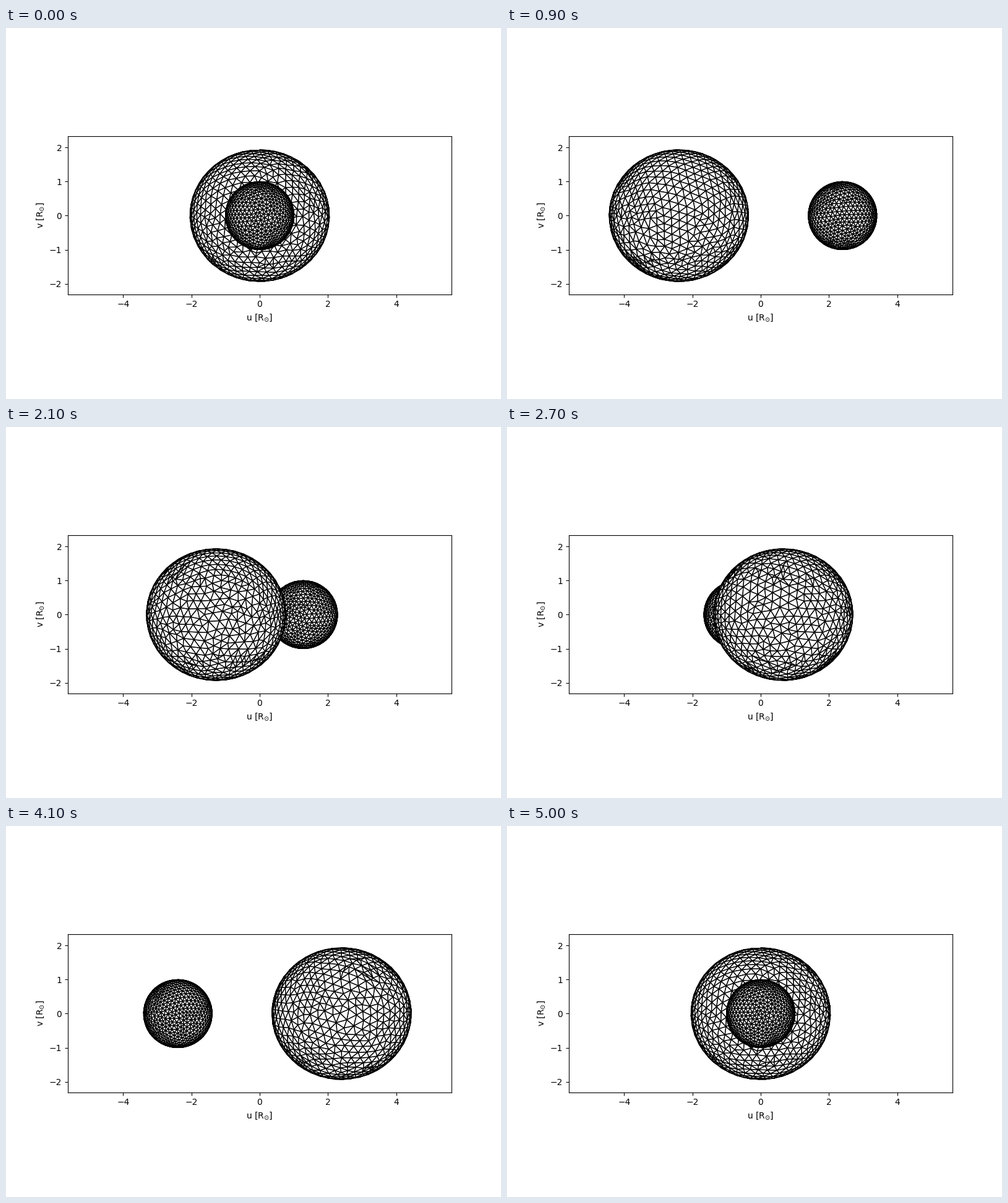
A matplotlib script for the animation above (5.1 s loop, 800 px wide and 600 px high).

```python
import math

import numpy as np
import matplotlib.pyplot as plt
from matplotlib.animation import FuncAnimation
from matplotlib.collections import PolyCollection
from matplotlib.tri import Triangulation

FRAMES, INTERVAL = 51, 100
SMA = 5.3            # separation of the two stars, in solar radii
TRIANGLES = 1500     # per star
TAU = 2 * math.pi


def unit(v):
    return v / np.linalg.norm(v, axis=-1, keepdims=True)


def gradient(p):
    """Gradient of the rotating-star potential (separation = 1)."""
    r = np.linalg.norm(p, axis=-1, keepdims=True)
    return -p / r**3 + 2 * p * np.array([1, 1, 0])


def normal(p):
    return -unit(gradient(p))


def project(p, pole):
    """Move p onto the equipotential surface with the given polar radius."""
    for _ in range(8):
        g = gradient(p)
        f = 1 / np.linalg.norm(p) + p[0]**2 + p[1]**2 - 1 / pole
        p = p - f * g / (g @ g)
    return p


def turn(n, a, b):
    """Angle from a to b, counterclockwise around n, in 0..TAU."""
    dot = lambda s, t: np.sum(s * t, axis=-1)
    return np.arctan2(dot(n, np.cross(a, b)),
                      dot(a, b) - dot(a, n) * dot(b, n)) % TAU


def find_contact(p, n, omega, step):
    """Closest pair of front points that meet across the open region."""
    count = len(p)
    i, j = np.triu_indices(count, 3)
    dist = np.linalg.norm(p[i] - p[j], axis=1)
    near = np.flatnonzero((j - i <= count - 3) & (dist < step))

    def faces(s, t):
        return turn(n[s], p[s - 1] - p[s], p[t] - p[s]) < omega[s]

    for k in near[np.argsort(dist[near], kind="stable")]:
        if faces(i[k], j[k]) or faces(j[k], i[k]):
            return i[k], j[k]
    return None


def march(pole, step):
    """Grow points over the surface from the pole with an advancing front."""
    points = [np.array([0.0, 0.0, pole])]
    for k in range(6):
        a = k * math.pi / 3
        points.append(project(
            points[0] - step * np.array([math.cos(a), math.sin(a), 0]), pole))
    fronts = [list(range(1, 7))]

    for _ in range(6000):
        while fronts and len(fronts[-1]) <= 3:
            fronts.pop()
        if not fronts or len(points) > 1100:
            break
        front = fronts.pop()
        p = np.array([points[k] for k in front])
        n = normal(p)
        before, after = np.roll(p, 1, axis=0), np.roll(p, -1, axis=0)
        omega = turn(n, before - p, after - p)

        pair = find_contact(p, n, omega, step)
        if pair:
            i, j = pair
            fronts += [front[i:j + 1], front[:i + 1] + front[j:]]
            continue

        omega[omega > 5.9] = 0
        m = int(np.argmin(omega))
        angle = omega[m]
        parts = int(3 * angle / math.pi) + 1
        if parts > 1 and angle / parts < 0.8:
            parts -= 1
        gap = np.linalg.norm(before[m] - after[m])
        shortest = min(np.linalg.norm(before[m] - p[m]),
                       np.linalg.norm(after[m] - p[m]))
        if parts == 1 and angle > 0.8 and gap > 1.25 * step:
            parts = 2
        if angle < 3 and shortest <= 0.5 * step:
            parts = 1

        # Points that belong to finished areas block new ones.
        done = np.ones(len(points), bool)
        done[front] = False
        solid = np.array(points)[done]
        side = before[m] - p[m]
        side = step * unit(side - n[m] * (side @ n[m]))
        fresh = []
        for k in range(1, parts):
            a = k * angle / parts
            q = project(p[m] + side * math.cos(a)
                        + np.cross(n[m], side) * math.sin(a), pole)
            if np.linalg.norm(solid - q, axis=1).min() > 0.55 * step:
                fresh.append(len(points))
                points.append(q)
        front[m:m + 1] = fresh
        fronts.append(front)

    kept = []
    for q in points:
        if not kept or np.linalg.norm(np.array(kept) - q, axis=1).min() > 0.55 * step:
            kept.append(q)
    return kept


def connect(points):
    """Spherical Delaunay triangles by stereographic projection from point 0."""
    d = unit(points[1:])
    flat = Triangulation(d[:, 0] / (1 - d[:, 2]), d[:, 1] / (1 - d[:, 2]))
    tris = flat.triangles
    t, e = np.nonzero(flat.neighbors < 0)
    fan = np.column_stack([tris[t, e], tris[t, (e + 1) % 3], np.full(len(t), -1)])
    return np.vstack([tris, fan]) + 1


def face_normals(corners):
    n = unit(np.cross(corners[:, 1] - corners[:, 0], corners[:, 2] - corners[:, 0]))
    out = np.sign(np.sum(n * corners.mean(axis=1), axis=1))
    return n * out[:, None]


def build_star(radius, polar):
    """Triangle corners and face normals, in solar radii."""
    mean, pole = radius / SMA, polar / SMA
    step = math.sqrt(4 / math.sqrt(3) * 4 * math.pi * mean**2 / TRIANGLES)
    points = np.array(march(pole, step))
    for _ in range(500):
        corners = points[connect(points)]
        normals = face_normals(corners)
        reach = np.linalg.norm(normals * mean - corners[:, 0], axis=1)
        worst = int(np.argmax(reach))
        if reach[worst] < 0.95 * step:
            break
        points = np.vstack([points, project(normals[worst] * mean, pole)])
    # Push corners out so that the flat faces keep the volume.
    swell = 1 + (step / mean)**2 / 8
    return corners * SMA * swell, normals


def view(star, sign, theta):
    """Visible triangles on the sky plane and their depths."""
    corners, normals = star
    c, s = math.cos(theta), math.sin(theta)
    seen = sign * (normals[:, 0] * c - normals[:, 1] * s) > 0
    x, y, z = np.moveaxis(corners[seen], -1, 0)
    x = x - SMA / 2
    u = sign * (x * s + y * c)
    w = sign * (x * c - y * s)
    return np.stack([u, z], axis=-1), w.mean(axis=1)


primary = build_star(2.0, 1.927)
secondary = build_star(1.0, 0.9955)

fig, ax = plt.subplots(figsize=(8, 6), dpi=100)
ax.set_aspect("equal")
ax.set_xlim(-5.617, 5.617)
ax.set_ylim(-2.305, 2.320)
ax.set_xticks(range(-4, 5, 2))
ax.set_yticks(range(-2, 3))
ax.set_xlabel(r"u [$\mathrm{R_{\odot}}$]")
ax.set_ylabel(r"v [$\mathrm{R_{\odot}}$]")
mesh = PolyCollection([], facecolors="white", edgecolors="black", linewidths=1.0)
ax.add_collection(mesh, autolim=False)


def update(frame):
    theta = TAU * frame / (FRAMES - 1)
    views = [view(primary, 1, theta), view(secondary, -1, theta)]
    faces = np.concatenate([v[0] for v in views])
    depth = np.concatenate([v[1] for v in views])
    mesh.set_verts(faces[np.argsort(depth)])
    return [mesh]


anim = FuncAnimation(fig, update, frames=FRAMES, interval=INTERVAL,
                     repeat=True, repeat_delay=0, blit=False)
plt.show()
```
